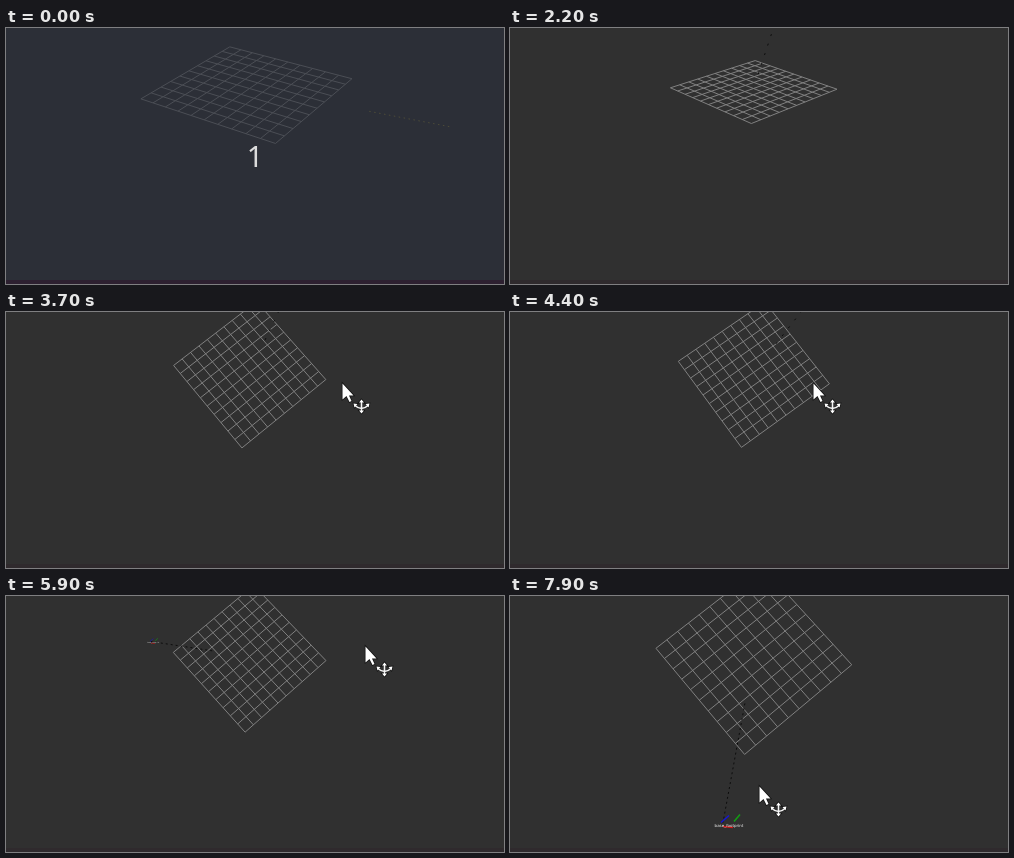
Animation, 498 px wide and 256 px high, one loop 8000 ms. Source, as an HTML page with a canvas:

```html
<!DOCTYPE html>
<html lang="en">
<head>
<meta charset="utf-8">
<title>Orbiting grid view</title>
<style>
  html, body { margin: 0; width: 100%; height: 100%; overflow: hidden; background: #303030; }
  canvas { display: block; }
</style>
</head>
<body>
<canvas id="stage" width="498" height="256"></canvas>
<script>
const ctx = document.getElementById('stage').getContext('2d');
const LOOP = 8000, STEP = 100;
const FOCAL = 683, CENTER = { x: 243.5, y: 60.5 }; // on pixel centers
const rad = deg => deg * Math.PI / 180;

// Everything that moves, as sums of ramps from 0 to 1 between two times.
function sceneAt(t) {
  const ramp = (from, to) => Math.min(1, Math.max(0, (t - from) / (to - from)));
  const pitch = 26.7 - 4.8 * ramp(0, 900) + 51.9 * ramp(2700, 3600) ** 1.7;
  const dragX = 327 + 18 * ramp(3500, 3900) - 42 * ramp(3900, 4200)
              + 62 * ramp(5200, 5700) - 24 * ramp(5700, 6500);
  const dragging = t > 2700;
  return {
    pitch,
    yaw: dragging ? (dragX - 303) / 10 - 8.8 : 12 - 13.3 * ramp(0, 900),
    distance: 44.8 * 1.41 ** ramp(1900, 2300) * 0.778 ** ramp(7500, 7900),
    bearing: -23 + 70 * ramp(0, 900) + 9 * ramp(900, 1100) + 27 * ramp(1300, 1800)
           - 30 * ramp(2700, 4400) + 118 * ramp(5000, 5900)
           + 56 * ramp(5900, 6800) + 33 * ramp(6800, 7900),
    range: 13 + 8 * ramp(0, 800) - 15 * ramp(2700, 6800) + 5.8 * ramp(7400, 7900),
    robotSize: 0.4 + 0.6 * ramp(7400, 7900),
    pointer: {
      x: dragX - 92 * ramp(6500, 7900),
      y: (pitch - 20) * 1.3 - 21 * ramp(5300, 5900) + 140 * ramp(7300, 7900),
      shown: dragging && t < 4500 || t >= 5300 && t < 6500 || t >= 7000
    }
  };
}

// Projects a point on the ground plane; depth points away from the camera.
function project({ pitch, distance }, x, depth) {
  const scale = FOCAL / (distance + depth * Math.cos(rad(pitch)));
  return [CENTER.x + x * scale, CENTER.y - depth * Math.sin(rad(pitch)) * scale];
}

function line(color, from, to) {
  ctx.strokeStyle = color;
  ctx.beginPath();
  ctx.moveTo(...from);
  ctx.lineTo(...to);
  ctx.stroke();
}

function drawGrid(scene, color) {
  const turn = rad(scene.yaw + 45), c = Math.cos(turn), s = Math.sin(turn);
  const at = (x, y) => project(scene, x * c - y * s, x * s + y * c);
  ctx.lineWidth = 1;
  for (let i = -5; i <= 5; i++) {
    line(color, at(i, -5), at(i, 5));
    line(color, at(-5, i), at(5, i));
  }
}

// Dashed link from the grid center to the robot; returns the robot's place.
function drawLink(scene, color, dash, begin) {
  const b = rad(scene.bearing);
  const at = r => project(scene, r * Math.cos(b), r * Math.sin(b));
  const robot = at(scene.range);
  ctx.setLineDash(dash);
  line(color, at(begin), robot);
  ctx.setLineDash([]);
  return robot;
}

function drawRobot([x, y], size) {
  ctx.save();
  ctx.translate(x, y);
  ctx.scale(size, size);
  ctx.lineWidth = 1.5;
  line('#1515d8', [-2, 0], [6, -7]);
  line('#d01515', [0, 4], [10, 5]);
  line('#12a012', [11, -1], [17, -8]);
  ctx.font = '4px "DejaVu Sans", sans-serif';
  ctx.textAlign = 'center';
  ctx.fillStyle = '#f4f4f4';
  ctx.fillText('base_footprint', 6, 4);
  ctx.restore();
}

const arrow = new Path2D('M0 0V16L4 12.5 7 18.5 9 17.5 6.5 12H11Z');
const orbitIcon = new Path2D('M0 -5V5M-6.5 -1Q0 5 6.5 -1');
const orbitHeads = new Path2D('M0 -7L2.5 -4H-2.5ZM0 7L2.5 4H-2.5ZM-8 -3L-4 -2.5 -7 1ZM8 -3L4 -2.5 7 1Z');

function drawPointer({ x, y }) {
  ctx.save();
  ctx.translate(x + 0.5, y + 1.5);
  ctx.lineWidth = 1.5;
  ctx.strokeStyle = '#111111';
  ctx.stroke(arrow);
  ctx.fillStyle = '#ffffff';
  ctx.fill(arrow);
  ctx.translate(19, 23);
  ctx.stroke(orbitHeads);
  ctx.strokeStyle = '#f4f4f4';
  ctx.stroke(orbitIcon);
  ctx.fill(orbitHeads);
  ctx.restore();
}

function fillBand(color, top) {
  ctx.fillStyle = color;
  ctx.fillRect(0, top, 498, 256 - top);
}

function draw(t) {
  const scene = sceneAt(t);
  if (t < 100) {
    fillBand('#2c2f37', 0);
    fillBand('#2d2030', 252);
    drawGrid(scene, '#4b4e55');
    drawLink(scene, '#4c4b38', [1.5, 3.5], 8);
    ctx.font = '29px "Noto Sans", sans-serif';
    ctx.textAlign = 'center';
    ctx.fillStyle = '#dcdcdc';
    ctx.fillText('1', 249, 139);
    return;
  }
  fillBand('#303030', 0);
  fillBand('#2f2a2d', 252);
  drawGrid(scene, '#808080');
  if (t < 2000) {
    drawLink(scene, '#77761c', [1.5, 3.5], 5.5);
  } else {
    const robot = drawLink(scene, '#0c0c0c', t < 5300 ? [2, 8] : [2, 3], 3.5);
    drawRobot(robot, scene.robotSize);
  }
  if (scene.pointer.shown) drawPointer(scene.pointer);
}

const start = performance.now();
function tick() {
  const t = (performance.now() - start) % LOOP;
  draw(Math.floor(t / STEP) * STEP);
  requestAnimationFrame(tick);
}
tick();
</script>
</body>
</html>
```
